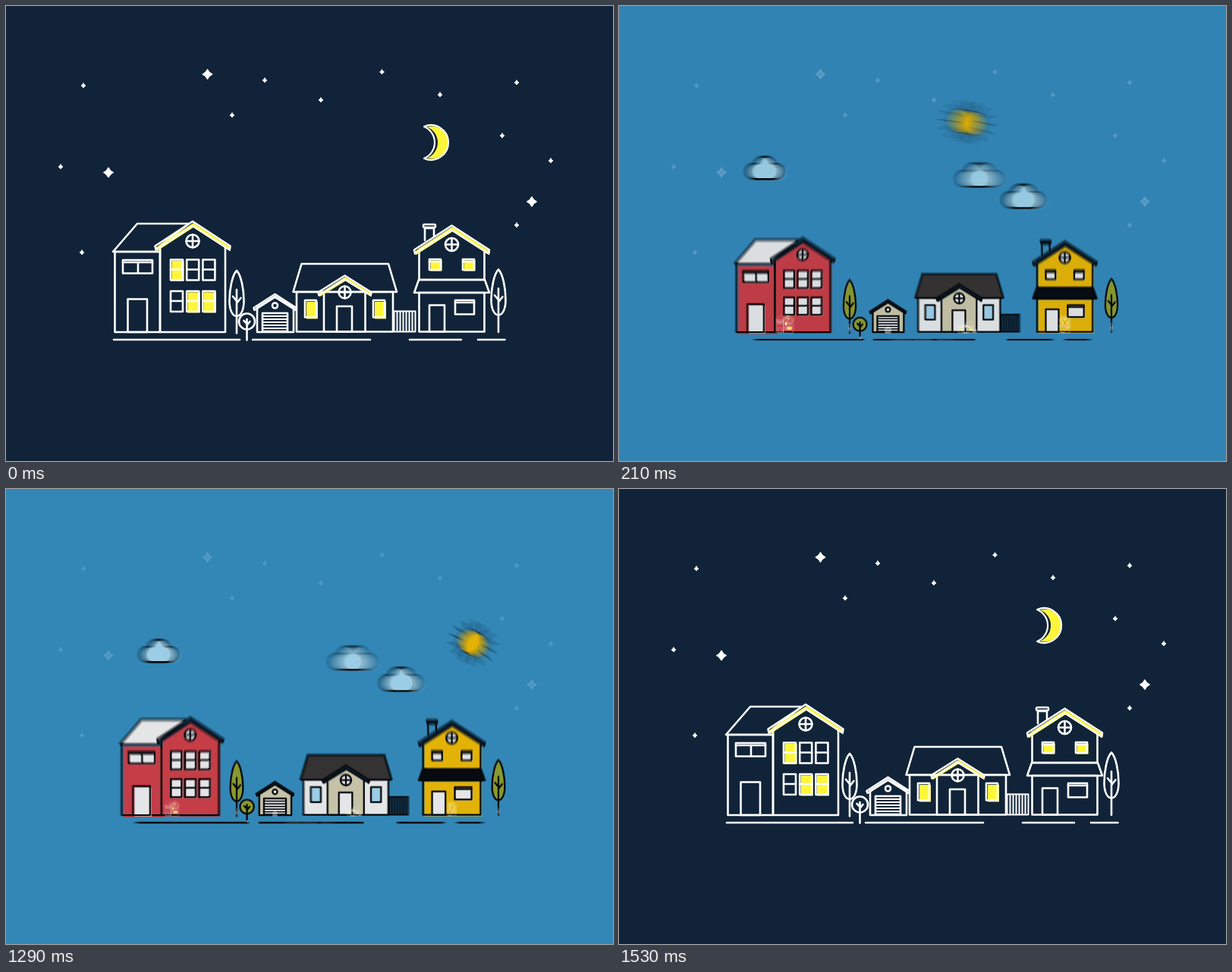
Recreate the animation shown at these times as an HTML page with a canvas. Size 800x600 px, loop 2.43 s.

```html
<!DOCTYPE html>
<html lang="en">
<head>
<meta charset="utf-8">
<title>Day and night street</title>
<style>
html, body { margin: 0; width: 100%; height: 100%; overflow: hidden; background: #102338; }
canvas { display: block; width: 100%; height: 100%; }
</style>
</head>
<body>
<canvas id="stage" width="800" height="600"></canvas>
<script>
const LOOP = 2430, DUSK = 1200, TURN = 330, STEP = 30, SHUTTER = 11.5, BLUR_DEPTH = 5;
const NIGHT = [16, 35, 56], DAY = [55, 148, 200];
const GLOW = '#fff63a', RED = '#dc4049', GOLD = '#ffc500', TAN = '#ded7b6',
      WHITE = '#ffffff', SKY = '#aee5fd', LEAF = '#98a92c', SLATE = '#12304a', INK = '#04080c';

const stage = document.getElementById('stage').getContext('2d');
const layers = Array.from({ length: BLUR_DEPTH + 1 }, () => {
  const canvas = document.createElement('canvas');
  canvas.width = 800;
  canvas.height = 600;
  return canvas.getContext('2d');
});
const g = layers[0];
g.lineJoin = g.lineCap = 'round';

// Cubic bezier easing (.58, 0, .3, 1), solved by bisection.
function ease(p) {
  if (p <= 0) return 0;
  if (p >= 1) return 1;
  let lo = 0, hi = 1, s;
  for (let i = 0; i < 24; i++) {
    s = (lo + hi) / 2;
    const x = 3 * (1 - s) ** 2 * s * 0.58 + 3 * (1 - s) * s * s * 0.3 + s ** 3;
    if (x < p) lo = s; else hi = s;
  }
  return s * s * (3 - 2 * s);
}

// ---- drawing helpers ----
let isDay, light;   // layer being drawn, and daylight from 0 to 1

const fromNight = rgb => `rgb(${NIGHT.map((n, i) => Math.round(n + (rgb[i] - n) * light))})`;
const lit = hex => fromNight([1, 3, 5].map(i => parseInt(hex.slice(i, i + 2), 16)));
const tint = (day, night) => isDay ? lit(day) : night;

function shape(d, fill, dx = 0, dy = dx) {
  const path = new Path2D(d);
  if (fill) {
    g.save();
    g.translate(dx, dy);
    g.fillStyle = fill;
    g.fill(path);
    g.restore();
  }
  g.stroke(path);
}

const box = (x, y, x2, y2) => `M${x} ${y}H${x2}V${y2}H${x}Z`;
const circle = (x, y, r) => `M${x - r} ${y}a${r} ${r} 0 1 1 ${2 * r} 0a${r} ${r} 0 1 1 ${-2 * r} 0Z`;

function gable(x, y, half, drop, thick) {
  shape(`M${x - half} ${y + drop}L${x} ${y}L${x + half} ${y + drop}l-1 ${thick}` +
        `L${x} ${y + thick + 1}L${x - half + 1} ${y + drop + thick}Z`, tint(SLATE, GLOW), 1, 2);
}

function roundWindow(x, y, r) {
  shape(circle(x, y, r), tint(WHITE));
  shape(`M${x - r} ${y}h${2 * r}M${x} ${y - r}v${2 * r}`);
}

function barWindow(x, y, x2, y2, night) {
  shape(box(x, y, x2, y2), tint(WHITE, night), 1.5);
  shape(`M${x} ${y + 3}H${x2}`);
}

function group(x, base, scale, draw) {
  if (scale < 0.002) return;
  g.save();
  g.translate(x, base);
  g.scale(scale, scale);
  g.translate(-x, -base);
  draw();
  g.restore();
}

// ---- street ----
function redHouse() {
  shape('M143.5 324V430H203V324Z', tint(RED), 3);
  shape('M203 430V317L246 289L289 317V430Z', tint(RED), 2);
  shape('M141 324L173 287H241L203 316V324Z', tint(WHITE));
  barWindow(154, 335, 193, 352.5);
  shape('M174 338V352');
  shape(box(160.5, 386.5, 186, 430), tint(WHITE), 2);
  for (const y of [334.5, 376]) {
    for (let i = 0; i < 3; i++) {
      const x = 217 + i * 21.2;
      const glowing = (y < 350) === (i === 0);
      shape(box(x, y, x + 16, y + 27), tint(WHITE, glowing && GLOW), 1.5);
      shape(`M${x} ${y + 13}h16`);
    }
  }
  roundWindow(246, 310, 8.5);
  gable(246, 284, 49.5, 32.5, 5);
}

function garage() {
  shape('M331 430V398L354.5 383L379 398V430Z', tint(TAN));
  shape(circle(354.5, 395, 3.5), tint(WHITE));
  shape(box(338, 405, 371, 429), tint(WHITE));
  g.lineWidth = 1.8;
  for (let y = 409; y < 428; y += 4) shape(`M338 ${y}H371`);
  g.lineWidth = 2.6;
  shape('M326.5 398L354.5 380L382.5 398l-1 3L354.5 384L327.5 401Z', tint(SLATE));
}

function bungalow() {
  shape(box(383, 377, 510, 429.5), tint(WHITE));
  shape('M389.5 340H504L515 377H378.5Z', tint('#393431'));
  shape('M419 429.5V377L446.5 359L473.5 377V429.5Z', tint(TAN));
  for (const x of [394, 484]) shape(box(x, 388, x + 15, 410.5), tint(SKY, GLOW), isDay ? 0 : 2);
  shape(box(436, 396, 456, 429.5), tint(WHITE));
  roundWindow(446.5, 377.5, 8);
  gable(446.5, 355.5, 35, 22, 4);
  g.lineWidth = 2;
  shape(box(511.5, 402.5, 539.5, 429.5), tint('#1d4868'));
  for (let x = 515.5; x < 538; x += 4) shape(`M${x} 403V429`);
  g.lineWidth = 2.6;
}

function yellowHouse() {
  shape('M552 309V293H564V303');
  shape('M551.5 288H564.5Q566 288 566 290T564.5 292H551.5Q550 292 550 290T551.5 288Z', tint(SLATE));
  shape('M544.5 361V321L587.5 293L630.5 321V361Z', tint(GOLD), 2, 0);
  shape(box(544.5, 378, 630.5, 429.5), tint(GOLD), 2);
  shape('M544 361H631L637 378H538Z', tint(INK));
  barWindow(558, 334, 573, 348, GLOW);
  barWindow(602, 334, 617, 348, GLOW);
  barWindow(592, 388, 617, 406.5);
  shape(box(558, 394.5, 578, 429.5), tint(WHITE));
  roundWindow(587.5, 314.5, 8.5);
  gable(587.5, 289.5, 49.5, 32, 5);
}

function tallTree(x, top, base) {
  shape(`M${x} ${top}c6 6 9.5 25 9.5 40c0 12-4 20-9.5 20s-9.5-8-9.5-20c0-15 3.5-34 9.5-40Z`, tint(LEAF), 1);
  shape(`M${x} ${top + 25}V${base}M${x} ${top + 43}l5.5-7M${x} ${top + 40}l-5-6`);
}

function smallTree() {
  shape(circle(317.5, 416, 10.5), tint(LEAF), 1);
  shape('M317.5 413V440.5M317.5 421l4-5M317.5 419l-4-4');
}

function ground() {
  shape('M142 440H308M325 440H480M532 440H600M622 440H657.5');
}

const STREET = [
  [400, 440, ground],
  [219, 431, redHouse],
  [354.5, 431, garage],
  [459, 431, bungalow],
  [588, 431, yellowHouse],
  [304, 432, () => tallTree(304, 349, 431.5)],
  [649, 431, () => tallTree(649, 347.5, 430)],
  [318, 441, smallTree]
];

function street(day, scale) {
  isDay = day;
  g.strokeStyle = day ? INK : WHITE;
  g.lineWidth = 2.6;
  for (const [x, base, draw] of STREET) group(x, base, scale, draw);
}

// ---- sky ----
const SMALL_STARS = [[102, 105], [298, 144], [341, 98], [415, 124], [495.5, 87], [572, 117],
  [673, 101], [654, 171], [718, 204], [673, 289], [72, 212], [100, 325]];
const BIG_STARS = [[265.5, 90], [135, 219.5], [693, 258]];

function star(x, y, r) {
  const k = r * 0.3;
  g.lineWidth = r * 0.3;
  shape(`M${x} ${y - r}Q${x + k} ${y - k} ${x + r} ${y}Q${x + k} ${y + k} ${x} ${y + r}` +
        `Q${x - k} ${y + k} ${x - r} ${y}Q${x - k} ${y - k} ${x} ${y - r}Z`, WHITE);
}

function stars(alpha) {
  g.globalAlpha = alpha;
  g.strokeStyle = WHITE;
  for (const [x, y] of SMALL_STARS) star(x, y, 3);
  for (const [x, y] of BIG_STARS) star(x, y, 6);
  g.globalAlpha = 1;
}

function cloud(x, y, scale) {
  g.save();
  g.translate(x, y);
  g.scale(scale, scale);
  g.strokeStyle = INK;
  g.lineWidth = 2.7;
  shape('M11.5 33A11 11 0 0 1 12.5 11A12.3 12.3 0 0 1 36.5 11A11.2 11.2 0 0 1 39.5 33Z', lit(SKY), 3, 1.5);
  g.restore();
}

// Both lights share one arc: in from the lower left, out to the lower right.
function arrive(e) {
  const a = e - 0.5, b = a * (e - 0.85), c = b * (e - 1);
  return [190 + 766 * a - 79 * b, 203 - 143 * a + 646 * b - 850 * c, (e - 1) * 60];
}
function leave(e) {
  return [567 + 419 * e - 120 * e * e, 180 + 172 * e + 180 * e * e, e * 60];
}

function place([x, y, turn], draw) {
  g.save();
  g.translate(x, y);
  g.rotate(turn * Math.PI / 180);
  draw();
  g.restore();
}

function sun() {
  g.strokeStyle = '#182c40';
  g.lineWidth = 2;
  for (let i = 0; i < 14; i++) {
    const a = i * Math.PI / 7, x = Math.sin(a), y = -Math.cos(a);
    shape(`M${x * 18.5} ${y * 18.5}L${x * 27.5} ${y * 27.5}`);
  }
  shape(circle(0, 0, 16), lit(GOLD), 1, 1.5);
}

function moon() {
  g.fillStyle = GLOW;
  g.fill(new Path2D('M-12 -20.5A21.5 21.5 0 1 1 -12 20.5A22 22 0 0 0 -12 -20.5Z'));
  g.strokeStyle = WHITE;
  g.lineWidth = 2.2;
  shape('M-16 -21A22.9 22.9 0 1 1 -16 21A22.75 22.75 0 0 0 -16 -21Z');
}

// Eased progress of the current turn, and how far the day has come.
function phase(t) {
  const morning = t < DUSK;
  const e = ease((morning ? t : t - DUSK) / TURN);
  return { morning, e, day: morning ? e : 1 - e };
}

// ---- one instant, without blur ----
function scene(t) {
  const { morning, e, day } = phase(t);
  const away = 1 - day;
  g.fillStyle = fromNight(DAY);
  g.fillRect(0, 0, 800, 600);
  place(morning ? arrive(e) : leave(e), sun);
  place(morning ? leave(e) : arrive(e), moon);
  cloud(214.5 - 307 * away, 197, 0.95);
  cloud(361.5 + 594 * away, 205.5, 1);
  cloud(447.5 + 408 * away, 233.5, 1);
  stars(1 - light);
  street(true, day);
  street(false, away);
}

// Motion blur: average both halves of the interval, level by level.
function expose(depth, from, to) {
  const middle = (from + to) / 2;
  if (depth === 0) return scene(middle);
  const target = layers[depth], source = layers[depth - 1].canvas;
  expose(depth - 1, from, middle);
  target.globalAlpha = 1;
  target.drawImage(source, 0, 0);
  expose(depth - 1, middle, to);
  target.globalAlpha = 0.5;
  target.drawImage(source, 0, 0);
}

function render(t) {
  const { e, day } = phase(t);
  const depth = e > 0 && e < 1 ? BLUR_DEPTH : 0;
  light = day;
  expose(depth, t - SHUTTER / 2, t + SHUTTER / 2);
  stage.drawImage(layers[depth].canvas, 0, 0);
}

const start = performance.now();
let shown = -1;
function tick() {
  const t = Math.floor((performance.now() - start) % LOOP / STEP) * STEP;
  if (t !== shown) render(shown = t);
  requestAnimationFrame(tick);
}
tick();
</script>
</body>
</html>
```
